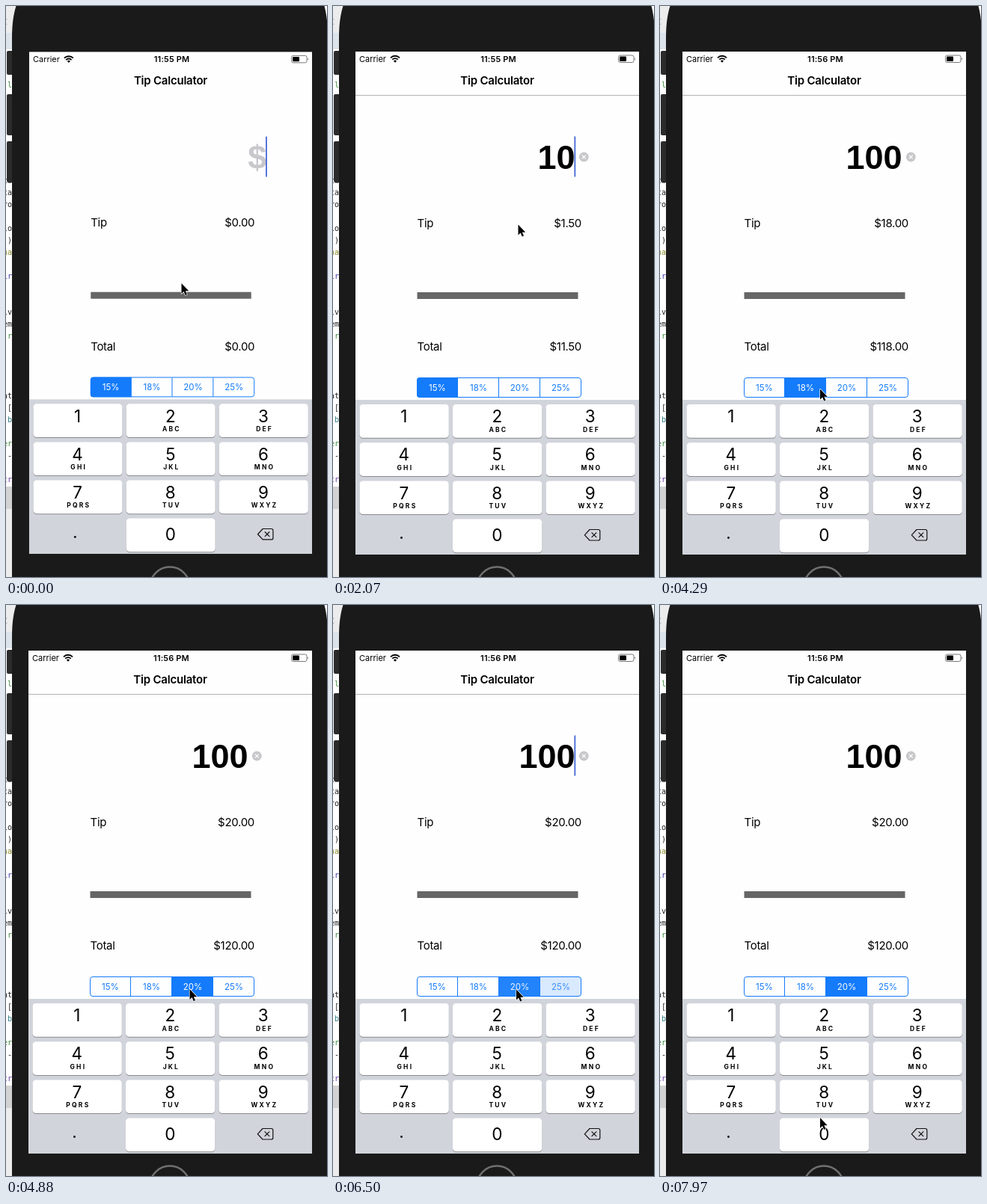
These frames come from a looping animation (429x764 px, 8 s). An HTML page:

```html
<!DOCTYPE html>
<html lang="en">
<head>
<meta charset="utf-8">
<title>Tip Calculator</title>
<style>
  html, body { margin: 0; width: 100%; height: 100%; overflow: hidden; background: #1a1a1a; }
  svg { display: block; width: 429px; height: 764px; }
  text { font-family: Inter, Roboto, sans-serif; white-space: pre; }
  .code { font: 10px "DejaVu Sans Mono", monospace; }
  .status { font-size: 11px; }
  .clock { font-weight: 600; letter-spacing: .15px; text-anchor: middle; }
  .title { font-size: 15px; font-weight: 600; letter-spacing: -.2px; text-anchor: middle; }
  .label { font-size: 15px; letter-spacing: -.3px; }
  .end { text-anchor: end; }
  .amount { font: bold 45px "Liberation Sans", Arial, sans-serif; text-anchor: end; }
  .seg { font-size: 11.5px; text-anchor: middle; }
  .digit { font-size: 22.5px; text-anchor: middle; }
  .letters { font-size: 8.5px; font-weight: 700; letter-spacing: 2.2px; text-anchor: middle; }
</style>
</head>
<body>
<svg viewBox="0 0 429 764" xmlns="http://www.w3.org/2000/svg">
  <defs>
    <clipPath id="segClip"><rect x="112" y="497" width="220" height="27" rx="4"/></clipPath>
  </defs>

  <g id="editor">
    <rect width="429" height="764" fill="#fff"/>
    <rect width="20" height="36" fill="#ececec"/>
    <rect y="36" width="20" height="22" fill="#dce3ea"/>
    <rect y="643" width="20" height="30" fill="#d2d2d2"/>
    <rect y="673" width="20" height="91" fill="#ececec"/>
    <text class="code" x="-4" y="25" fill="#999">C</text>
  </g>

  <g id="phone">
    <g fill="#2b2b2b">
      <rect x="1" y="60" width="10" height="32" rx="2"/>
      <rect x="1" y="118" width="10" height="55" rx="2"/>
      <rect x="1" y="181" width="10" height="55" rx="2"/>
    </g>
    <path d="M13.500 0C10 11 8 24 8 42V764H430V42C430 24 428.500 11 425.500 0Z" fill="#1a1a1a"/>
    <circle cx="219" cy="777" r="26.500" fill="none" stroke="#707070" stroke-width="2.500"/>
  </g>

  <g id="screen">
    <rect x="30" y="61" width="379" height="673" fill="#fefefe"/>
    <text class="status" x="35" y="75">Carrier</text>
    <g fill="none" stroke="#000" stroke-width="1.900">
      <path d="M77 69.300A8.500 8.500 0 0 1 89 69.300M79.300 71.700A5.200 5.200 0 0 1 86.700 71.700"/>
      <path d="M83 75.700L80.900 73.500A3 3 0 0 1 85.100 73.500Z" fill="#000" stroke="none"/>
    </g>
    <text id="clock" class="status clock" x="221" y="74.500"></text>
    <rect x="381.500" y="66" width="20.500" height="9.500" rx="2.300" fill="none" stroke="#777"/>
    <rect x="383" y="67.500" width="9" height="6.500" rx="1"/>
    <path d="M403.200 69.200Q405.200 70.700 403.200 72.300Z" fill="#777"/>
    <text class="title" x="219.500" y="105">Tip Calculator</text>
    <rect id="navLine" x="30" y="119" width="379" height="1" fill="#b2b2b2"/>

    <text id="amount" class="amount" y="217.500"></text>
    <rect id="caret" y="174.500" width="1.800" height="54" fill="#4468d8"/>
    <g id="clear">
      <circle cx="335.300" cy="202" r="6.400" fill="#c8c8cb"/>
      <path d="M332.900 199.600l4.800 4.800m0-4.800l-4.800 4.800" stroke="#fff" stroke-width="1.200"/>
    </g>

    <text class="label" x="112.500" y="295.500">Tip</text>
    <text id="tip" class="label end" x="332" y="295.500"></text>
    <rect x="112.500" y="383" width="215" height="9" fill="#666"/>
    <text class="label" x="112.500" y="461">Total</text>
    <text id="total" class="label end" x="332" y="461"></text>

    <g id="segments" clip-path="url(#segClip)"></g>
    <g fill="none" stroke="#147bfb">
      <rect x="112.500" y="497.500" width="219" height="26" rx="3.500"/>
      <path d="M166.500 498v25M221.500 498v25M276.500 498v25"/>
    </g>

    <rect x="30" y="527" width="379" height="207" fill="#d1d4db"/>
    <g id="keys"></g>
    <circle cx="91.500" cy="711.500" r="1.400"/>
    <g fill="none" stroke="#111" stroke-width="1.200" stroke-linejoin="round" stroke-linecap="round">
      <path d="M343 700.500H354.500Q356.800 700.500 356.800 702.800V712.700Q356.800 715 354.500 715H343L336.300 707.800Z"/>
      <path d="M346 704.800l5.800 5.900m0-5.900l-5.800 5.900"/>
    </g>
  </g>

  <path id="pointer" d="M.5 0V14L3.600 11.100L5.700 16L8 15L5.800 10.200H10.200Z"
        stroke="#fff" stroke-width="1.300" paint-order="stroke" stroke-linejoin="round"/>
</svg>
<script>
const LOOP = 8000;
const STEP = 147.6;
const BLUE = [20, 123, 251];
const RATES = [15, 18, 20, 25];

const $ = id => document.getElementById(id);
const clamp = v => Math.min(1, Math.max(0, v));
const smooth = p => p * p * (3 - 2 * p);
const money = value => '$' + value.toFixed(2);
const mixWhite = k => `rgb(${BLUE.map(c => Math.round(c + (255 - c) * k))})`;

function set(el, attrs) {
  for (const key in attrs) el.setAttribute(key, attrs[key]);
}

function add(parent, tag, attrs, text = '') {
  const el = document.createElementNS('http://www.w3.org/2000/svg', tag);
  set(el, attrs);
  el.textContent = text;
  parent.append(el);
  return el;
}

// Slivers of code visible beside the phone, one per line
const CODE_COLOURS = { l: '#3c8a3c', r: '#3c8a3c', er: '#3c8a3c', na: '#8a8a2a', ir: '#3a3ab0', tr: '#6a35a5', '(b': '#2f7f86' };
'l,,,,,,b,,ta,ta,ro,,lo,(),na,,ir,,,lv,em,r,,,,,at,[,(b,,er,-,,tr'.split(',').forEach((text, i) =>
  add($('editor'), 'text', { class: 'code', x: -4, y: 109 + 16 * i, fill: CODE_COLOURS[text] || '#222' }, text.padStart(2)));

const segments = RATES.map((rate, i) => {
  const x = 112 + 55 * i;
  return {
    fill: add($('segments'), 'rect', { x, y: 497, width: 55, height: 27, fill: `rgb(${BLUE})` }),
    text: add($('segments'), 'text', { class: 'seg', x: x + 27.5, y: 514.5 }, rate + '%')
  };
});

function addKey(col, row, digit, letters) {
  const x = 35.5 + 124.5 * col, y = 533 + 51.2 * row;
  const box = { x, width: 119.3, height: 44.7, rx: 4.5 };
  const keys = $('keys'), mid = x + 59.3;
  add(keys, 'rect', { ...box, y: y + 1, fill: '#898b90' });
  add(keys, 'rect', { ...box, y, fill: '#fff' });
  add(keys, 'text', { class: 'digit', x: mid, y: y + (row < 3 ? 24.2 : 29.7) }, digit);
  add(keys, 'text', { class: 'letters', x: mid + 1.6, y: y + 37 }, letters);
}
['', 'ABC', 'DEF', 'GHI', 'JKL', 'MNO', 'PQRS', 'TUV', 'WXYZ']
  .forEach((letters, i) => addKey(i % 3, Math.floor(i / 3), i + 1, letters));
addKey(1, 3, 0, '');

// The user's actions; all times are in ticks
const KEY_TICKS = [8, 13, 15];
const TYPED = '100';
const PICKS = [{ at: 26, to: 1 }, { at: 31, to: 2 }, { at: 38, to: 3 }, { at: 43, to: 2 }];
const CLOCK_TICK = 19;
const HOME = [234, 371];
const MOVES = [
  { from: 0, to: 3, end: [247, 292.5] },
  { from: 17, to: 21, end: [268, 411] },
  { from: 21, to: 24, end: [184, 512] },
  { from: 27, to: 29, end: [213.5, 512.5] },
  { from: 29, to: 31, end: [245, 514] },
  { from: 33, to: 37, end: [290, 504] },
  { from: 39, to: 43, end: [244.5, 514.5] },
  { from: 44, to: 47, end: [152, 630] },
  { from: 47, to: 49, end: [192, 635] },
  { from: 49, to: 53, end: [213.5, 686] }
];

function pointerAt(tick) {
  let pos = HOME;
  for (const { from, to, end } of MOVES) {
    const p = smooth(clamp((tick - from) / (to - from)));
    pos = pos.map((v, i) => v + (end[i] - v) * p);
  }
  return pos;
}

// Solid just after a key press, then half a second on and off
function caretOn(tick, lastKey) {
  const age = (tick - lastKey) * STEP;
  return age < 600 || (age + 850) % 1000 < 500;
}

// Crossfades the selected segment and returns the chosen rate
function drawSegments(tick) {
  const done = PICKS.filter(pick => pick.at <= tick);
  const [last, before] = [...done.reverse(), { at: -9, to: 0 }, { to: 0 }];
  const p = clamp((tick - last.at) / 2 + .25);
  segments.forEach(({ fill, text }, i) => {
    const k = i === last.to ? 1 - (1 - p) ** 2 : i === before.to ? 1 - smooth(p) : 0;
    set(fill, { opacity: k });
    set(text, { fill: mixWhite(k) });
  });
  return RATES[last.to];
}

function draw(tick) {
  const settled = tick > 0;
  set($('screen'), { transform: settled ? '' : 'translate(409 61.4) scale(.9974 .9978) translate(-409 -61)' });
  set($('navLine'), { opacity: +settled });
  $('clock').textContent = tick < CLOCK_TICK ? '11:55 PM' : '11:56 PM';

  const keys = KEY_TICKS.filter(key => key <= tick);
  const bill = +TYPED.slice(0, keys.length);
  const tip = bill * drawSegments(tick) / 100;
  const edge = bill ? 323.5 : 348;
  $('amount').textContent = bill || '$';
  set($('amount'), { x: edge, fill: bill ? '#000' : '#c7c7cc' });
  set($('clear'), { opacity: bill ? 1 : 0 });
  set($('caret'), { x: edge - 1.1, opacity: +caretOn(tick, keys.at(-1) ?? -3.66) });
  $('tip').textContent = money(tip);
  $('total').textContent = money(bill + tip);
  set($('pointer'), { transform: `translate(${pointerAt(tick)})` });
}

const begin = performance.now();
function frame() {
  const t = (performance.now() - begin) % LOOP;
  draw(Math.floor(t / STEP + .01));
  requestAnimationFrame(frame);
}
frame();
</script>
</body>
</html>
```
